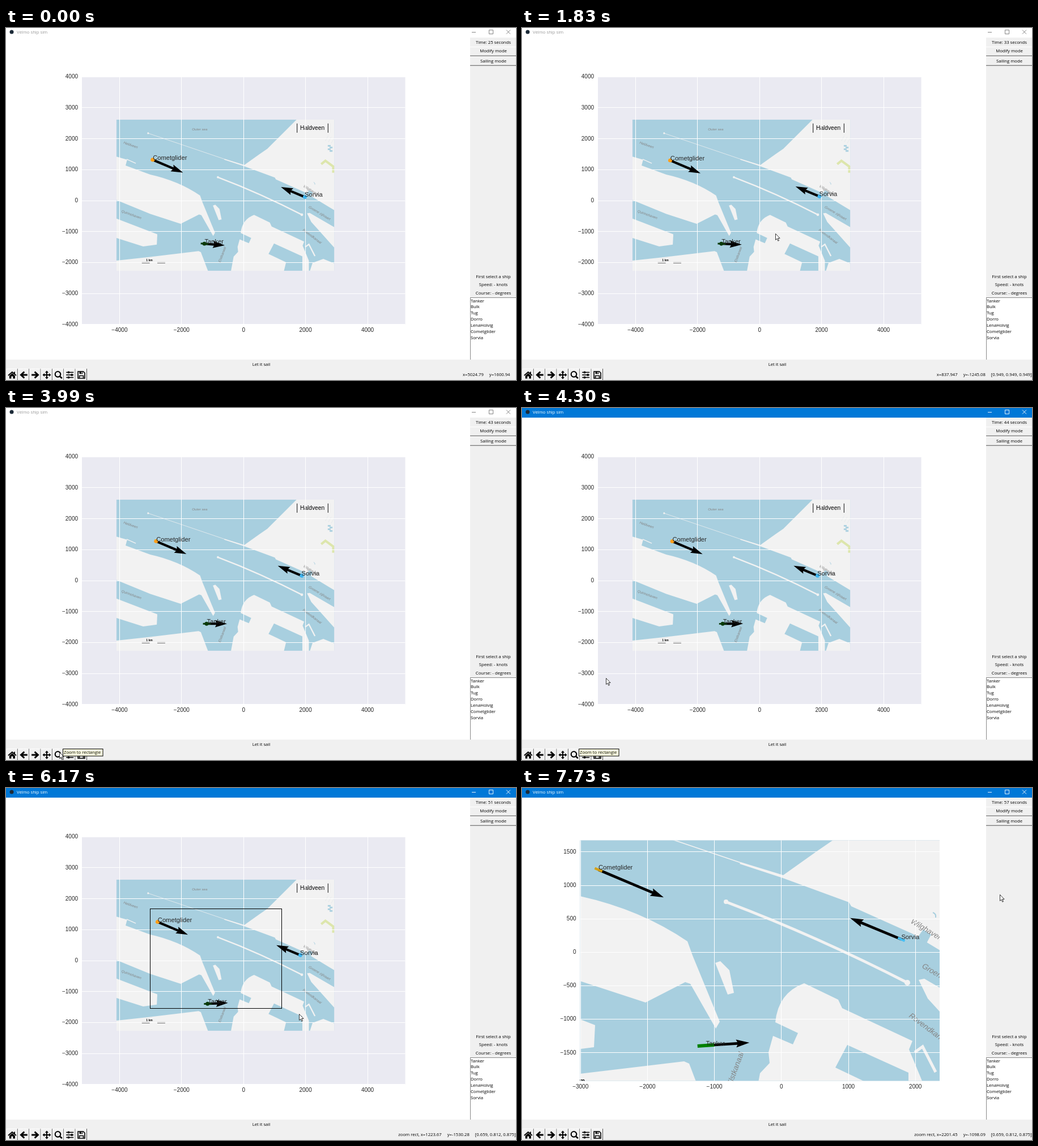
Animation of 900 by 622 pixels, one loop 8000 ms. Source, as an HTML page with a canvas:

```html
<!DOCTYPE html>
<html lang="en">
<head>
<meta charset="utf-8">
<title>Ship simulator</title>
<style>
  html, body { margin: 0; width: 100%; height: 100%; overflow: hidden; background: #fff; }
  canvas { display: block; width: 900px; height: 622px; }
</style>
</head>
<body>
<canvas id="stage" width="900" height="622"></canvas>
<script>
const ctx = document.getElementById('stage').getContext('2d');
const UI = '7.7px "Open Sans", "Noto Sans", sans-serif';
const PLOT = '"Liberation Sans", Arial, sans-serif';
const WATER = '#a8cfdf', LAND = '#f2f2f2', PANEL = '#f0f0f0', INK = '#262626';
const LAST = 25, FOCUS = 14, DRAG = 17, ZOOM = 21; // ticks

// Axes: pixel box, origin, scale, grid steps
const wide = { x: 134, y: 87, w: 570.5, h: 437, ox: 419.2, oy: 305, s: 0.0547, step: [2000, 1000] };
const near = { x: 102.5, y: 92.5, w: 634.5, h: 425, ox: 457.8, oy: 290.2, s: 0.1182, step: [1000, 500] };
const toX = (v, x) => v.ox + x * v.s;
const toY = (v, y) => v.oy - y * v.s;

// Coastlines, in the pixels of the near view
const coast = [
  'M660 -19L549 92 520 112 461 154 386 131 384 134 460 159 577 202 581 209 690 258 804 327V-19Z',
  'M-27 122L14 134 8 156 102 191Q210 215 292 271L301 296 349 413 342 425 297 346 288 343 218 379 102 341 -27 288Z',
  'M-27 359L129 419 127 458 75 465 -27 433Z',
  'M-27 519L102 505 286 483 295 487 322 558H-27Z',
  'M341 309L350 306 366 322 374 362 363 365Z',
  'M498 345L558 374 565 389 689 447 683 462 707 520V558H682V503L574 454 553 494 620 526 612 558H410L420 504 437 486 435 467 443 438 478 453 487 433 447 414Q452 362 498 345Z',
  'M700 339L710 337 804 392V470L737 395 716 372Z',
  'M721 528L762 513 804 530V558H711Z'
].map(d => new Path2D(d));

const waterNames = [
  ['Outer sea', 261, 22, 0], ['Haldveen', -1, 72, 20], ['Quirinehaven', -9, 334, 20],
  ['Wilghaven', 685, 238, 31], ['Groene zijlvaart', 705, 317, 31],
  ['Rovendkanaal', 682, 404, 37], ['Elstkanaal', 370, 527, -70]
];

// Positions and speeds in metres; lead is the reach of the course arrow
const ships = [
  { name: 'Tanker', x: -1256, y: -1394, vx: 4, vy: 0, len: 250, beam: 52,
    hull: '#008000', dot: '#0a3a0a', lead: t => [650, 2.9 * t - 50] },
  { name: 'Cometglider', x: -2926, y: 1316, vx: 6.1, vy: -2.6, len: 122, beam: 36,
    hull: '#d4a017', dot: '#ff9f1a', lead: () => [973, -412] },
  { name: 'Sorvia', x: 1971, y: 119, vx: -5.65, vy: 2.3, len: 112, beam: 36,
    hull: '#43bdf2', dot: '#3cb4f0', lead: () => [-765, 318] }
];

// Stops of the mouse: tick, then chart position
const stops = [
  [-0.5, 5024.79, 1600.94], [3.5, 4388.81, -1489.78], [4, 1824, -1810], [8.5, -1134.16, -115.227],
  [9, -1430, -548], [13, -5940, -5540], [16, -3003, 1664], [16.5, -2174.36, 268.656], [17, -1612, -548],
  [20.5, 2357.94, -1923.19], [21, 771, -1022], [24.5, 2201.45, -1098.09], [25, 3259, 865]
];

function mouse(k) {
  const i = Math.max(1, stops.findIndex(s => s[0] >= k));
  const a = stops[i - 1], b = stops[i], p = (k - a[0]) / (b[0] - a[0]);
  return [a[1] + (b[1] - a[1]) * p, a[2] + (b[2] - a[2]) * p];
}

// The readout trails the pointer by half a tick
const hover = k => mouse(k - 0.5);
const seconds = k => Math.round(25 + 1.28 * k + 0.9 * Math.sin(Math.PI * k / LAST));

function box(x, y, w, h, color) {
  ctx.fillStyle = color;
  ctx.fillRect(x, y, w, h);
}

function stroke(d, color, width = 1) {
  ctx.strokeStyle = color;
  ctx.lineWidth = width;
  ctx.stroke(new Path2D(d));
}

function fill(d, color) {
  ctx.fillStyle = color;
  ctx.fill(new Path2D(d));
}

function disc(x, y, r, color) {
  ctx.fillStyle = color;
  ctx.beginPath();
  ctx.arc(x, y, r, 0, 7);
  ctx.fill();
}

function text(str, x, y, { font = UI, color = '#000', align = 'left', base = 'middle' } = {}) {
  ctx.font = font;
  ctx.fillStyle = color;
  ctx.textAlign = align;
  ctx.textBaseline = base;
  ctx.fillText(str, x, y);
}

function placed(x, y, angle, draw) {
  ctx.save();
  ctx.translate(x, y);
  ctx.rotate(angle);
  draw();
  ctx.restore();
}

function clip(x, y, w, h) {
  ctx.beginPath();
  ctx.rect(x, y, w, h);
  ctx.clip();
}

function drawMap(v) {
  const z = v.s / near.s;
  ctx.save();
  clip(v.x, v.y, v.w, v.h);
  ctx.translate(v.ox, v.oy);
  ctx.scale(z, z);
  ctx.translate(-near.ox, -near.oy);
  clip(-27, -19, 831, 577);
  box(-27, -19, 831, 577, WATER);
  ctx.fillStyle = LAND;
  coast.forEach(p => ctx.fill(p));
  // Piers
  stroke('M94 33L386 132', LAND, 1.6);
  stroke('M12 132L47 148', LAND, 3);
  stroke('M362 202Q520 262 682 345M693 467L707 457 730 502', LAND, 5);
  disc(94, 33, 3.5, LAND);
  disc(360, 201, 4, LAND);
  disc(680, 344, 5, LAND);
  // Inland water and park
  fill('M698 264L708 250 722 259 714 274Z', WATER);
  stroke('M725 220Q731 222 730 229', WATER, 2);
  for (let i = 0; i < 4; i++) box(779 + i % 2 * 7, 78 + i * 6.5, 11, 6, WATER);
  for (let i = 0; i < 3; i++) stroke(`M${770 + i * 11} ${62 + i * 5}l11 -20`, '#dfe5e8', 1.5);
  stroke('M754 151L770 138 800 160V184', '#dde6ac', 9);
  for (const [str, x, y, deg] of waterNames) {
    placed(x, y, deg * Math.PI / 180, () =>
      text(str, 0, 0, { font: `italic 13.5px ${PLOT}`, color: '#858585', base: 'alphabetic' }));
  }
  text('Haldveen', 720, 14, { font: `22px ${PLOT}`, align: 'center' });
  stroke('M662 -4V31M780 -4V31', '#111', 2.2);
  text('1 km', 86, 521, { font: `bold 11px ${PLOT}`, base: 'alphabetic' });
  stroke('M70 527.5H100M129 527.5H159', '#777', 5);
  ctx.restore();
}

function drawGrid(v) {
  const opt = { font: `10px ${PLOT}`, color: INK };
  const label = n => String(n).replace('-', '\u2212');
  const [sx, sy] = v.step;
  for (let n = -4000; n <= 4000; n += sx) {
    const x = toX(v, n);
    if (x < v.x - 1 || x > v.x + v.w) continue;
    box(Math.floor(x), v.y, 1, v.h, '#fff');
    text(label(n), x, v.y + v.h + 10.5, { ...opt, align: 'center' });
  }
  for (let n = -4000; n <= 4000; n += sy) {
    const y = toY(v, n);
    if (y < v.y - 1 || y > v.y + v.h + 1) continue;
    box(v.x, Math.floor(y), v.w, 1, '#fff');
    text(label(n), v.x - 7, y + 0.3, { ...opt, align: 'right' });
  }
}

function drawShip(ship, v, sec, w) {
  const t = sec - 25, [dx, dy] = ship.lead(t);
  const x = toX(v, ship.x + ship.vx * t), y = toY(v, ship.y + ship.vy * t);
  const len = Math.hypot(dx, dy) * v.s, hl = ship.len * v.s, hb = ship.beam * v.s;
  const color = v === wide ? ship.dot : ship.hull;
  placed(x, y, Math.atan2(-dy, dx), () => {
    const neck = len - 4.5 * w, barb = len - 5 * w, h = w / 2;
    fill(`M0 ${-h}H${neck}L${barb} ${-3 * h}L${len} 0L${barb} ${3 * h}L${neck} ${h}H0Z`, '#000');
    box(-hl / 2, -hb / 2, hl, hb, color);
    if (v === wide) disc(-0.5, 0, 3.4, color);
  });
  text(ship.name, x, y, { font: `11.2px ${PLOT}`, color: INK, base: 'alphabetic' });
}

function drawPlot(k, sec) {
  const v = k < ZOOM ? wide : near;
  box(v.x, v.y, v.w, v.h, '#eaeaf2');
  drawMap(v);
  drawGrid(v);
  // Right after the zoom the arrows are still the old ones, scaled up
  const w = k === ZOOM ? 9.1 : v.w * 0.0074;
  ships.forEach(s => drawShip(s, v, sec, w));
  if (k >= DRAG && k < ZOOM) {
    const [x, y] = hover(k);
    ctx.strokeStyle = '#000';
    ctx.lineWidth = 1;
    ctx.strokeRect(254.5, 213.5, Math.round(toX(v, x)) - 254, Math.round(toY(v, y)) - 213);
  }
}

function drawTitle(active) {
  box(0, 0, 900, 17, active ? '#0078d7' : '#fff');
  disc(10, 7, 3.5, '#1c2a38');
  text('Velmo ship sim', 19, 7.5, { color: active ? '#fff' : '#999' });
  stroke('M822 7.5H829M852.5 3.5H859.5V10.5H852.5ZM883 3.5L890 10.5M890 3.5L883 10.5',
    active ? '#fff' : '#777', 0.9);
}

function drawSide(sec) {
  const row = (str, y) => text(str, 860, y, { align: 'center' });
  box(819, 17, 81, 569, PANEL);
  for (const y of [33, 50]) {
    box(819, y, 81, 1, '#fff');
    box(819, y + 15.7, 81, 1, '#555');
  }
  row(`Time: ${sec} seconds`, 25.5);
  row('Modify mode', 41);
  row('Sailing mode', 58.5);
  ['First select a ship', 'Speed: - knots', 'Course: - degrees'].forEach((s, i) => row(s, 440 + i * 14.3));
  box(819, 476, 81, 110, '#8a8a8a');
  box(820, 477, 80, 109, '#fff');
  ['Tanker', 'Bulk', 'Tug', 'Dorro', 'LenaHolvig', 'Cometglider', 'Sorvia']
    .forEach((n, i) => text(n, 820, 482.5 + i * 10.85));
}

function status(k) {
  const [x, y] = hover(k), gap = '\u00a0'.repeat(5);
  if (Math.abs(x) > 5200 || Math.abs(y) > 4000) return '';
  const num = n => Number(n.toPrecision(6));
  const onMap = x > -4098 && x < 2930 && y > -2257 && y < 2605;
  const onLand = coast.some(p => ctx.isPointInPath(p, toX(near, x), toY(near, y)));
  const rgb = onLand ? '[0.949, 0.949, 0.949]' : '[0.659, 0.812, 0.875]';
  return `${k > FOCUS ? 'zoom rect, ' : ''}x=${num(x)}${gap}y=${num(y)}${gap}${onMap ? rgb : ''}`;
}

const arrow = 'M-7 0L0 -6.5 2 -4.5 -1 -1.5H6.5V1.5H-1L2 4.5 0 6.5Z';
const icons = [
  () => {
    stroke('M-7 1L0 -5 7 1', '#000', 1.8);
    fill('M-5 1.5L0 -3 5 1.5V6.5H1.5V2.5H-1.5V6.5H-5ZM3 -5.5H5V-1L3 -2.5Z', '#000');
  },
  () => fill(arrow, '#000'),
  () => placed(0, 0, Math.PI, () => fill(arrow, '#000')),
  () => {
    for (let i = 0; i < 4; i++) {
      placed(0, 0, i * Math.PI / 2, () => fill('M0 -1H4V-3L7.5 0 4 3V1H0Z', '#000'));
    }
  },
  () => {
    stroke('M4 -1.2A4.8 4.8 0 1 1 -5.6 -1.2A4.8 4.8 0 1 1 4 -1.2', '#000', 2.1);
    stroke('M2.6 2.3L6.5 6.2', '#000', 2.6);
  },
  () => {
    for (let i = -1; i < 2; i++) {
      box(-6.5, i * 4.5 - 0.8, 13, 1.6, '#000');
      box(i ? -3.7 : 2, i * 4.5 - 1.8, 3, 3.6, '#000');
    }
  },
  () => {
    stroke('M-6 -6H3.5L6 -3.5V6H-6ZM-3.5 6V1.5H3.5V6', '#000', 1.6);
    box(-3.5, -6, 6, 4.2, '#000');
    box(0, -5.2, 1.5, 2.6, PANEL);
  }
];

function drawBottom(k) {
  box(0, 586, 900, 36, PANEL);
  text('Let it sail', 450.5, 594.5, { align: 'center' });
  icons.forEach((icon, i) => {
    const x = 0.5 + i * 20.35;
    box(x, 602, 20, 1, '#fff');
    box(x, 602, 1, 20, '#fff');
    box(x + 19.4, 602, 1, 20, '#555');
    placed(x + 10.4, 613, 0, icon);
  });
  text(status(k), 899.5, 612.5, { align: 'right' });
}

function drawPointer(k) {
  const [x, y] = mouse(k), v = k < ZOOM ? wide : near;
  placed(Math.round(toX(v, x)) + 0.5, Math.round(toY(v, y)) + 0.5, 0, () => {
    const d = 'M0 0V11L2.5 8.7 4.3 12.8 6 12 4.2 8H7.6Z';
    fill(d, '#fff');
    stroke(d, '#222', 0.9);
  });
}

function drawTip() {
  box(100, 602, 71.5, 13.5, '#000');
  box(101, 603, 69.5, 11.5, '#ffffe1');
  text('Zoom to rectangle', 102, 609);
}

let shown = -1;
function frame() {
  const k = Math.min(LAST, Math.floor((performance.now() % 8000 + 25) / 308.5));
  if (k !== shown) {
    shown = k;
    const sec = seconds(k);
    box(0, 0, 900, 622, '#fff');
    drawPlot(k, sec);
    drawTitle(k >= FOCUS);
    drawSide(sec);
    drawBottom(k);
    if (k > 0) drawPointer(k);
    if (k === FOCUS - 1 || k === FOCUS) drawTip();
  }
  requestAnimationFrame(frame);
}
frame();
</script>
</body>
</html>
```
